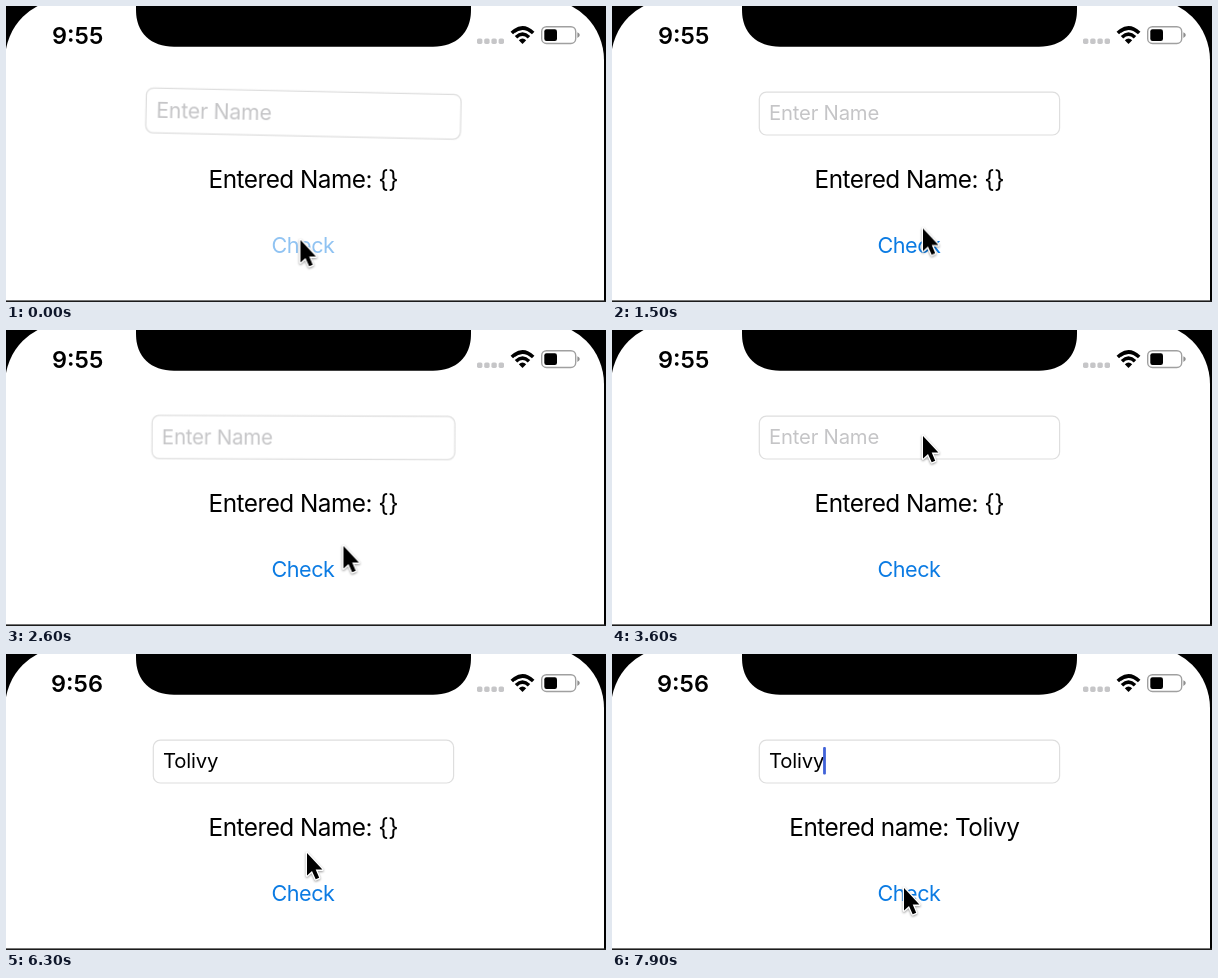
Recreate the animation shown at these times as an HTML page. Size 600x296 px, loop 8 s.

```html
<!DOCTYPE html>
<html lang="en">
<head>
<meta charset="utf-8">
<title>Name check</title>
<style>
  html, body { margin: 0; width: 100%; height: 100%; overflow: hidden; background: #000; }
  svg { display: block; width: 600px; height: 296px; font-family: Inter, Roboto, sans-serif; }

  #clock { font-size: 23.5px; font-weight: 600; }
  #label { font-size: 24.3px; letter-spacing: -.5px; }
  #entry { font-size: 20.3px; letter-spacing: -.2px; }
  #check { font-size: 21.6px; letter-spacing: -.45px; fill: #0b7be3; }
  .middle { text-anchor: middle; }

  #field, #label, #check, #cursor { animation: 8s ease-in-out infinite; }
  #field { animation-name: wiggle; transform-origin: 297.5px 107.5px; }
  #label { animation-name: slide; }
  #check { animation-name: press; animation-timing-function: linear; }
  #cursor { animation-name: point; }

  /* Starts part of the way into its first swing */
  @keyframes wiggle {
    0% { transform: rotate(1.2deg) scale(1.047); animation-timing-function: cubic-bezier(.31, .4, .57, 1); }
    2.425%, 29.3% { transform: rotate(5deg) scale(1.2); }
    6.175%, 25.55%, 33.05%, 100% { transform: rotate(0deg) scale(1); }
  }
  @keyframes slide {
    0%, 91.75%, 99.25%, 100% { transform: translateX(0); }
    95.5% { transform: translateX(-144.4px); }
  }
  @keyframes press {
    0% { opacity: .45; }
    3.5%, 24.37%, 29.5%, 89.7%, 95.5%, 100% { opacity: 1; }
    24.38%, 25.5%, 89.71%, 91.2% { opacity: .2; }
  }
  @keyframes point {
    0%, 12% { transform: translate(294.5px, 234px); }
    16.5%, 20% { transform: translate(311px, 222.5px); }
    24%, 28% { transform: translate(301.5px, 241.5px); }
    32.5%, 33.5% { transform: translate(337.5px, 216px); }
    39% { transform: translate(357.5px, 70px); }
    43.5%, 71% { transform: translate(311px, 106px); }
    78%, 79.5% { transform: translate(301px, 199px); }
    86%, 100% { transform: translate(292px, 234px); }
  }
</style>
</head>
<body>
<svg viewBox="0 0 600 296">
  <rect width="600" height="296" fill="#000"/>
  <rect x="-1" y="-7" width="599" height="400" rx="61" fill="#fff"/>
  <path d="M130 0V4C130 27 145 40.7 168 40.7H427C450 40.7 465 27 465 4V0Z"/>
  <rect y="294.4" width="600" height="1.6" fill="#1c1c1c"/>

  <text id="clock" x="46" y="37.7">9:55</text>
  <g fill="#c6c6c8">
    <rect x="471" y="32.5" width="5.4" height="5.4" rx="1.6"/>
    <rect x="478.2" y="32.5" width="5.4" height="5.4" rx="1.6"/>
    <rect x="485.4" y="32.5" width="5.4" height="5.4" rx="1.6"/>
    <rect x="492.6" y="32.5" width="5.4" height="5.4" rx="1.6"/>
  </g>
  <g fill="none" stroke="#000" stroke-width="3.6">
    <path d="M505.8 27Q516.5 17 527.2 27"/>
    <path d="M510 31.2Q516.5 25.2 523 31.2"/>
    <path d="M516.5 38L512.8 34.2Q516.5 31 520.2 34.2Z" fill="#000" stroke="none"/>
  </g>
  <rect x="535.7" y="20.7" width="34" height="16.8" rx="4.8" fill="none" stroke="#a0a0a0" stroke-width="1.4"/>
  <rect x="538.3" y="23.2" width="12.7" height="11.8" rx="2.2"/>
  <path d="M571.4 26.3Q573.8 27.3 573.8 29.1T571.4 31.9Z" fill="#8e8e8e"/>

  <g id="field">
    <rect x="147.3" y="86.2" width="300.3" height="42.8" rx="7" fill="#fff" stroke="#dedede" stroke-width="1.2"/>
    <text id="entry" x="157" y="114.4">Enter Name</text>
    <rect id="caret" x="157" y="93" width="2.8" height="27.5" rx="1" fill="#4062d8" visibility="hidden"/>
  </g>

  <text id="label" class="middle" x="297.3" y="182">Entered Name: {}</text>
  <text id="check" class="middle" x="297" y="247">Check</text>

  <g id="cursor">
    <path d="M0 0V22.6L5 18L8.7 26.3L12.2 24.8L8.7 16.6H15.4Z" stroke="#fff" stroke-width="2.6" stroke-linejoin="round"
      paint-order="stroke" style="filter: drop-shadow(0 1px 1.2px rgba(0, 0, 0, .4))"/>
  </g>
</svg>
<script>
  const $ = id => document.getElementById(id);
  const name = 'Tolivy';
  const keyTimes = [4650, 4850, 5000, 5200, 5380, 5550];
  const focusTime = 3900, minuteTime = 4150, resultTime = 7290;
  const motion = $('cursor').getAnimations()[0];

  function setText(id, text) {
    if ($(id).textContent !== text) $(id).textContent = text;
  }

  function caretShown(t) {
    if (t < focusTime) return false;
    const lastKey = Math.max(focusTime, ...keyTimes.filter(k => k <= t));
    return (t - lastKey) % 1000 < 500;
  }

  function draw() {
    const t = motion.currentTime % 8000;
    const typed = name.slice(0, keyTimes.filter(k => k <= t).length);
    const later = t >= minuteTime;

    setText('clock', later ? '9:56' : '9:55');
    $('clock').setAttribute('x', later ? 45 : 46);
    setText('entry', typed || 'Enter Name');
    $('entry').setAttribute('fill', typed ? '#000' : '#c5c5c7');
    setText('label', t >= resultTime ? 'Entered name: ' + name : 'Entered Name: {}');

    const end = typed ? $('entry').getComputedTextLength() : 0;
    $('caret').setAttribute('x', 156 + end);
    $('caret').setAttribute('visibility', caretShown(t) ? 'visible' : 'hidden');
    requestAnimationFrame(draw);
  }
  draw();
</script>
</body>
</html>
```
